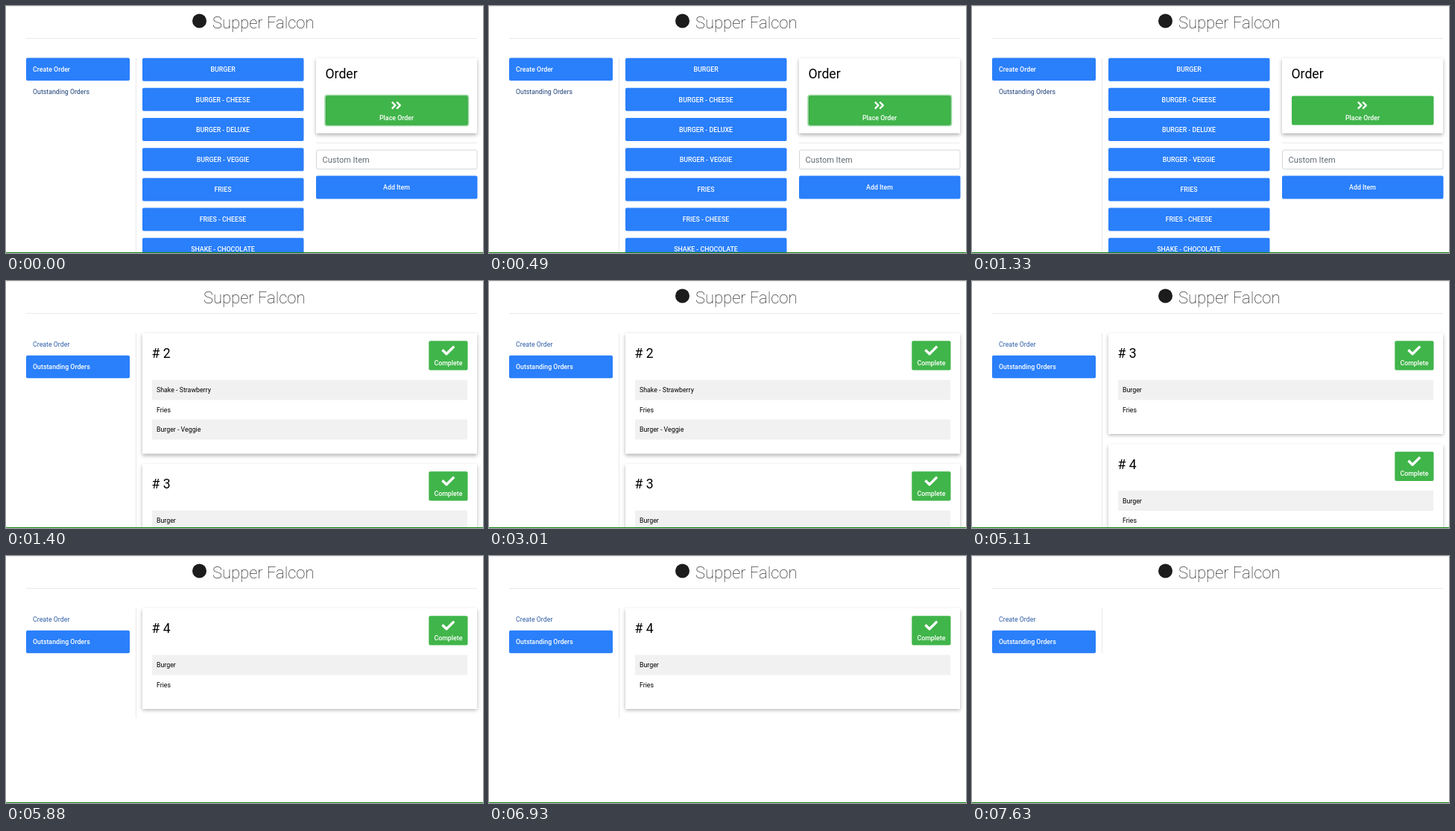
Write an HTML page with a canvas that moves like this. It is 640x331 px and loops after 8.12 s.

```html
<!DOCTYPE html>
<html lang="en">
<head>
<meta charset="utf-8">
<title>Supper Falcon</title>
<style>
  html, body { margin: 0; width: 100%; height: 100%; overflow: hidden; background: #fff; }
  canvas { display: block; width: 640px; height: 331px; }
</style>
</head>
<body>
<canvas id="stage"></canvas>
<script>
const W = 640, H = 331, LOOP = 8120, STEP = 70;
const REM = 8.8;
const BLUE = '#2a7ffa', GREEN = '#40b54a', RULE = '#e9e9e9';

// Moments of the story, in ms
const BLUR = 1190, OPEN = 1400, ICON = 1470;
const DONE = [4060, 5880, 7630];
const PRESS = 140;

const MENU = ['BURGER', 'BURGER - CHEESE', 'BURGER - DELUXE', 'BURGER - VEGGIE',
  'FRIES', 'FRIES - CHEESE', 'SHAKE - CHOCOLATE'];
const ORDERS = [
  { name: '# 2', items: ['Shake - Strawberry', 'Fries', 'Burger - Veggie'] },
  { name: '# 3', items: ['Burger', 'Fries'] },
  { name: '# 4', items: ['Burger', 'Fries'] }
];
const ROW = 26.5, CARD_PAD = 82, CARD_GAP = 13.5, TOP = 70;

const canvas = document.getElementById('stage');
const ctx = canvas.getContext('2d');
const dpr = window.devicePixelRatio || 1;
canvas.width = W * dpr;
canvas.height = H * dpr;

const clamp = v => Math.max(0, Math.min(1, v));

function rect(x, y, w, h, color) {
  ctx.fillStyle = color;
  ctx.fillRect(x, y, w, h);
}

function box(x, y, w, h, color, r = 2) {
  ctx.fillStyle = color;
  ctx.beginPath();
  ctx.roundRect(x, y, w, h, r);
  ctx.fill();
}

// Text is centred vertically on its capitals
function text(str, x, cy, { size = REM, weight = 400, color = '#000', align = 'left' } = {}) {
  ctx.font = `${weight} ${size}px Roboto, sans-serif`;
  ctx.textAlign = align;
  ctx.fillStyle = color;
  ctx.fillText(str, x, cy + size * 0.355);
}

function label(str, x, cy) {
  text(str, x, cy, { weight: 500, color: '#fff', align: 'center' });
}

function line(points, width) {
  ctx.strokeStyle = '#fff';
  ctx.lineWidth = width;
  ctx.lineJoin = 'round';
  ctx.beginPath();
  points.forEach(([x, y]) => ctx.lineTo(x, y));
  ctx.stroke();
}

function card(x, y, w, h) {
  ctx.save();
  ctx.shadowColor = 'rgba(0,0,0,0.3)';
  ctx.shadowBlur = 5 * dpr;
  ctx.shadowOffsetY = 2.4 * dpr;
  rect(x, y, w, h, '#fff');
  ctx.restore();
}

function greenButton(x, y, w, h, glow) {
  if (glow > 0) box(x - 1.8, y - 1.8, w + 3.6, h + 3.6, `rgba(64,181,74,${0.5 * glow})`, 3.5);
  box(x, y, w, h, GREEN);
  if (glow > 0) {
    ctx.strokeStyle = `rgba(40,145,55,${0.6 * glow})`;
    ctx.lineWidth = 0.8;
    ctx.beginPath();
    ctx.roundRect(x + 0.4, y + 0.4, w - 0.8, h - 0.8, 2);
    ctx.stroke();
  }
}

function header(hasIcon) {
  if (hasIcon) {
    ctx.fillStyle = '#1c1c1c';
    ctx.beginPath();
    ctx.arc(259.5, 20, 9.5, 0, Math.PI * 2);
    ctx.fill();
  }
  text('Supper Falcon', hasIcon ? 277 : 265, 21.7, { size: REM * 2.5, weight: 100, color: '#111' });
  rect(27, 43, 605, 1, RULE);
}

function nav(active, height) {
  ['Create Order', 'Outstanding Orders'].forEach((name, i) => {
    const on = i === active, y = 69.5 + i * 30.3;
    if (on) box(27, y, 139, 30.5, BLUE);
    const idle = i ? '#1d3f78' : '#2d5ca6';
    text(name, 36, y + 15.4, { weight: on ? 500 : 400, color: on ? '#fff' : idle });
  });
  rect(174, TOP, 1, height, RULE);
}

function createPage(glow) {
  MENU.forEach((name, i) => {
    const y = 69.7 + i * 40.17;
    box(183, y, 216.5, 31, BLUE);
    label(name, 291, y + 15.6);
  });

  card(416, TOP, 216, 100.5);
  text('Order', 428.5, 91, { size: REM * 2 });
  greenButton(429, 120.5, 190.5, 39, glow);
  for (const x of [517.8, 524.2]) line([[x, 128.6], [x + 4.6, 133.1], [x, 137.6]], 2.3);
  label('Place Order', 524, 149.5);

  rect(416, 183, 216, 1, RULE);
  ctx.strokeStyle = '#d3d7db';
  ctx.lineWidth = 1;
  ctx.beginPath();
  ctx.roundRect(416.5, 193, 215.5, 25.5, 2);
  ctx.stroke();
  text('Custom Item', 424.5, 206.3, { size: REM * 1.25, color: '#626a72' });
  box(416, 227.5, 216.5, 31, BLUE);
  label('Add Item', 524, 243.2);
}

const cardHeight = order => CARD_PAD + order.items.length * ROW;

function orderCard(order, y, glow) {
  card(183, y, 449, cardHeight(order));
  text(order.name, 195.5, y + 27.2, { size: REM * 2 });
  greenButton(567.3, y + 10.3, 52.2, 39.2, glow);
  const cx = 593.3, cy = y + 23.4;
  line([[cx - 7.9, cy - 1.2], [cx - 2.3, cy + 4.4], [cx + 7.9, cy - 5.8]], 3.4);
  label('Complete', 593.4, y + 39.4);
  order.items.forEach((item, i) => {
    const top = y + 62.5 + i * ROW;
    if (i % 2 === 0) rect(196, top, 423, ROW + 0.5, '#f1f1f1');
    text(item, 202, top + 13.6);
  });
}

function draw(t) {
  ctx.setTransform(dpr, 0, 0, dpr, 0, 0);
  rect(0, 0, W, H, '#fff');
  rect(0, 0, W, 1, '#eeeeee');
  header(t < OPEN || t >= ICON);

  if (t < OPEN) {
    nav(0, H);
    createPage(1 - clamp((t - BLUR) / PRESS));
  } else {
    const done = DONE.filter(d => t >= d).length;
    const open = ORDERS.slice(done);
    const total = open.reduce((sum, o) => sum + cardHeight(o) + CARD_GAP, 0);
    nav(1, Math.max(60, total - 1));
    let y = TOP;
    open.forEach((order, i) => {
      const glow = i ? 0 : clamp((t - DONE[done] + PRESS + STEP) / PRESS);
      orderCard(order, y, glow);
      y += cardHeight(order) + CARD_GAP;
    });
  }
  rect(0, 330, W, 1, '#128212');
}

const start = performance.now();
function tick() {
  const t = (performance.now() - start) % LOOP;
  draw(Math.floor(t / STEP) * STEP);
  requestAnimationFrame(tick);
}
tick();
</script>
</body>
</html>
```
